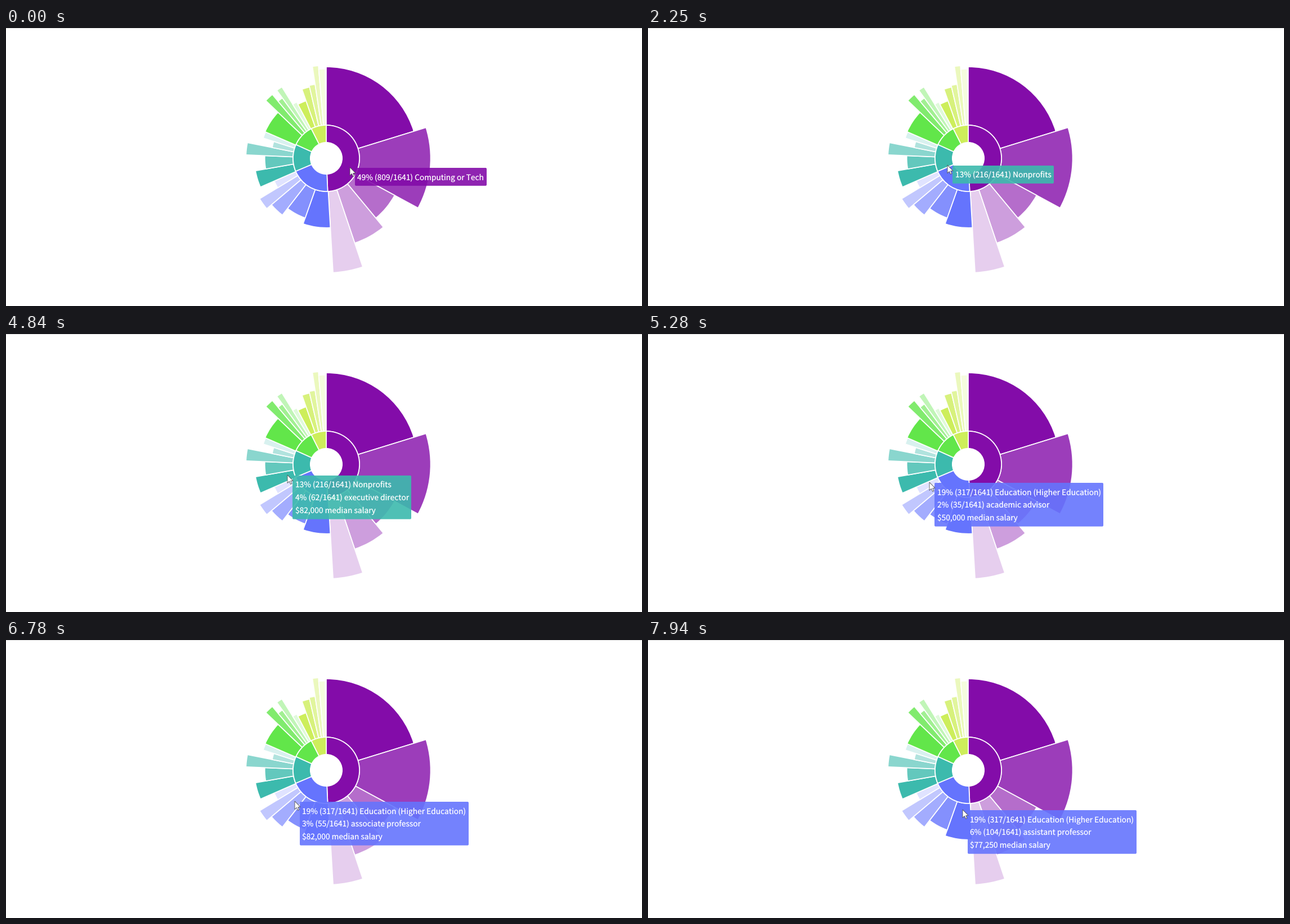
These frames come from a looping animation (1130x495 px, 8000 ms). A matplotlib script:

```python
import math
from itertools import zip_longest

import matplotlib.pyplot as plt
import numpy as np
from matplotlib.animation import FuncAnimation
from matplotlib.patches import FancyBboxPatch, Polygon, Rectangle, Wedge

W, H, DPI = 1130, 495, 100
LOOP, STEP = 8000, 40
CX, CY = 569, 232
R_HOLE, R_RING = 28.2, 59
PX = 72 / DPI
TOTAL = 1641
PAY_SCALE = 0.838  # pixels of radius per $1,000
ROW = 22.9

plt.rcParams["font.family"] = "Noto Sans CJK JP"
plt.rcParams["text.hinting"] = "none"

# Colour, name, people, people per job, pay per job in $1,000, job titles.
FIELDS = [
    ("#830ca9", "Computing or Tech", 809,
     (332, 208, 100, 96, 69), (124, 151, 94.5, 119.5, 173), ()),
    ("#6574fd", "Education (Higher Education)", 317,
     (104, 83, 55, 41, 35), (77.25, 64, 82, 95, 50),
     ("assistant professor", "instructor", "associate professor",
      "professor", "academic advisor")),
    ("#3cbaad", "Nonprofits", 216,
     (62, 57, 40, 30, 26), (82, 60, 100, 46.5, 70),
     ("executive director", "program manager")),
    ("#62e64a", "", 177,
     (92, 28, 19, 19, 19), (71, 107, 88, 108, 64.5), ()),
    ("#cdee5b", "", 122,
     (38, 28, 21, 17, 19), (59, 85, 88.5, 127, 119.5), ()),
]

START = (611, 248)
# Pointer moves: start ms, end ms, steps, bend of the path, end of the path.
MOVES = [
    (690, 1460, 10, (565, 266), (559, 264)),
    (1910, 2620, 10, (538, 256), (525, 233)),
    (3240, 3860, 9, (503, 243), (501, 247)),
    (4840, 5350, 8, (498, 256), (500, 264.4)),
    (5490, 5590, 3, (501, 266), (502, 267)),
    (6020, 6780, 11, (503, 280), (513, 287)),
    (6850, 7630, 11, (524, 300), (540, 305)),
    (7710, 7940, 4, (550, 303), (559, 302)),
]

ARROW = np.array([(0, 0), (0, 14.5), (3.4, 11.4), (5.6, 16.4), (7.8, 15.4),
                  (5.7, 10.6), (10, 10.4)])


def tint(color, alpha):
    rgb = np.array([int(color[i:i + 2], 16) for i in (1, 3, 5)]) / 255
    return tuple(rgb * alpha + 1 - alpha)


def share(count, name):
    return f"{count / TOTAL:.0%} ({count}/{TOTAL}) {name}"


def build():
    """Segments as (start angle, end angle, inner r, outer r, tint, lines)."""
    rings, jobs = [], []
    ring_sum = job_sum = 0
    turn = 360 / TOTAL
    for color, name, people, counts, pays, roles in FIELDS:
        head = share(people, name)
        rings.append((ring_sum * turn, (ring_sum + people) * turn,
                      R_HOLE, R_RING, color, 1, [head]))
        ring_sum += people
        for i, (count, pay, role) in enumerate(
                zip_longest(counts, pays, roles)):
            lines = [head]
            if role:
                lines += [share(count, role),
                          f"${pay * 1000:,.0f} median salary"]
            jobs.append((job_sum * turn, (job_sum + count) * turn, R_RING,
                         R_RING + pay * PAY_SCALE, color, 1 - i / 5, lines))
            job_sum += count
    return jobs + rings


def pointer(t):
    """Position on a bent path, eased out and moved in discrete steps."""
    pos = np.array(START, float)
    for t0, t1, steps, bend, end in MOVES:
        if t < t0:
            break
        gap = (t1 - t0) / (steps - 1)
        u = min(1, (int((t - t0) / gap + 0.2) + 1) / steps)
        s = 1 - (1 - u) ** 2
        pos = ((1 - s) ** 2 * pos + 2 * s * (1 - s) * np.array(bend)
               + s * s * np.array(end))
    return np.round(pos)


def find(x, y):
    """Colour and text lines of the segment under a point."""
    dx, dy = x - CX, y - CY
    r = math.hypot(dx, dy)
    angle = math.degrees(math.atan2(dx, -dy)) % 360
    for a0, a1, r0, r1, color, _, lines in SEGMENTS:
        if a0 <= angle < a1 and r0 <= r < r1:
            return color, lines
    return None


SEGMENTS = build()

fig = plt.figure(figsize=(W / DPI, H / DPI), dpi=DPI, facecolor="white")
ax = fig.add_axes([0, 0, 1, 1])
ax.set_xlim(0, W)
ax.set_ylim(H, 0)
ax.axis("off")

ax.add_patch(Rectangle((0, 0), W, 1, fc="#dcdcdc", lw=0))
for a0, a1, r0, r1, color, alpha, _ in SEGMENTS:
    ax.add_patch(Wedge((CX, CY), r1, a0 - 90, a1 - 90, width=r1 - r0,
                       fc=tint(color, alpha), ec="white", lw=1.7 * PX))

box = ax.add_patch(FancyBboxPatch((0, 0), 1, 1, lw=0, alpha=0.9, zorder=3,
                                  boxstyle="round,pad=0,rounding_size=2"))
labels = [ax.text(0, 0, "", color="white", size=13.75 * PX, va="baseline",
                  parse_math=False, zorder=4) for _ in range(3)]
arrow = ax.add_patch(Polygon(ARROW, fc="white", ec="#4a4a4a", lw=0.8 * PX,
                             zorder=5))


def draw(k):
    x, y = pointer((k + 0.5) * STEP)
    arrow.set_xy(ARROW + (x, y))
    hit = find(x, y)
    box.set_visible(hit is not None)
    color, lines = hit or ("white", [])
    left, top = x + 9, y + 1
    width = 0
    for i, (label, line) in enumerate(zip_longest(labels, lines,
                                                  fillvalue="")):
        label.set_text(line)
        label.set_position((left + 4.5, top + 21.2 + ROW * i))
        if line:
            width = max(width, label.get_window_extent().width)
    box.set_facecolor(color)
    box.set_bounds(left, top, round(width + 9), 9 + ROW * len(lines))
    return [box, arrow, *labels]


anim = FuncAnimation(fig, draw, frames=LOOP // STEP, interval=STEP,
                     repeat=True, repeat_delay=0)
plt.show()
```
